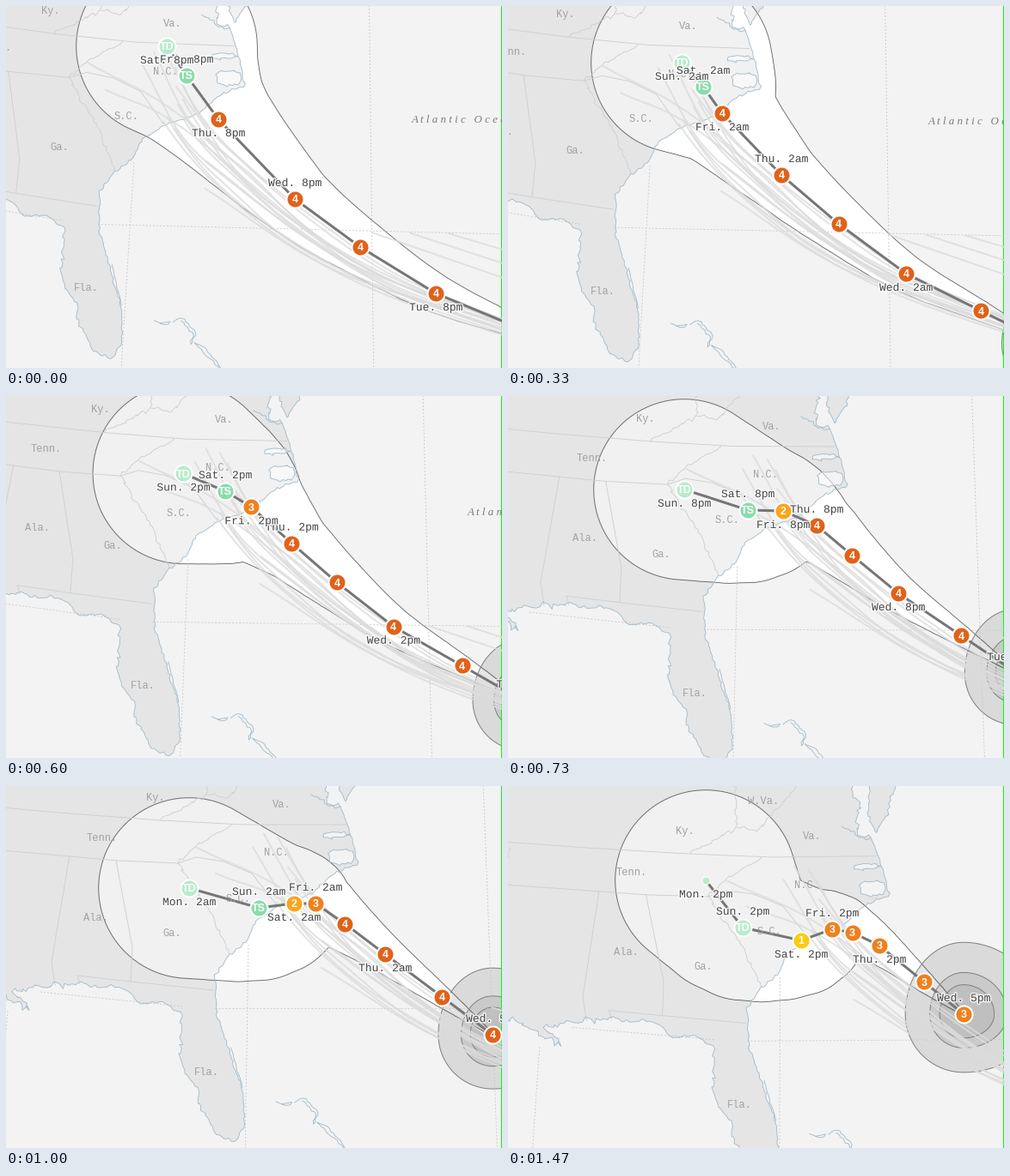
Animation, 577 px wide and 422 px high, one loop 1.54 s. Source, as a matplotlib script:

```python
import math

import numpy as np
import matplotlib.pyplot as plt
from matplotlib.animation import FuncAnimation
from matplotlib.patheffects import withStroke

W, H = 577, 422
LOOP, TICK = 1540, 10
STEP_TIMES = [0, 70, 130, 330, 400, 460, 530, 600, 660, 730, 800, 930,
              1000, 1270, 1330, 1400, 1470]

OCEAN, COAST, BORDER, LINE = "#f3f3f3", "#a6bccb", "#cfcfcf", "#767676"
COLORS = {"-": "#b8ecca", "D": "#b8ecca", "S": "#8adcab", "1": "#fccb10",
          "2": "#f9a51b", "3": "#ef801d", "4": "#e0621a"}
DAYS = ["Tue", "Wed", "Thu", "Fri", "Sat", "Sun", "Mon"]
HOURS = ["8pm", "2am", "8am", "2pm"]
NOW_HOURS = ["11pm", "5am", "11am", "5pm"]
LEAD = np.array([120, 96, 72, 48, 36, 24, 12, 0])

# step, advisory, map anchor, strengths, positions 120, 96, 72, 48, 24 and 0 hours ahead
KEYS = [
    (0, 0, (62, 164), "DS444444", [(187, 47), (210, 81), (247, 132), (336, 225), (500, 335), (680, 410)]),
    (3, 1, (78, 168), "DS444444", [(202, 66), (227, 94), (249, 125), (318, 197), (463, 312), (628, 394)]),
    (6, 2, (97, 169), "DS344444", [(207, 81), (243, 100), (268, 127), (319, 182), (449, 288), (606, 371)]),
    (9, 4, (178, 184), "DS244444", [(205, 109), (279, 133), (320, 134), (359, 151), (454, 230), (592, 323)]),
    (12, 5, (193, 171), "DS234444", [(213, 119), (294, 142), (335, 137), (360, 137), (441, 196), (566, 290)]),
    (13, 6, (205, 185), "DS234444", [(224, 117), (287, 155), (342, 157), (370, 151), (434, 190), (544, 278)]),
    (16, 7, (227, 210), "-D133333", [(230, 110), (273, 165), (341, 180), (377, 167), (432, 186), (530, 266)]),
]
KEY_STEPS = [k[0] for k in KEYS]
HOME = np.array([193, 171])

rng = np.random.default_rng(7)


def rough(points, amp=1.2, gap=3.5):
    """Resample a line and shake it like a shoreline."""
    p = np.array(points, float)
    d = np.r_[0, np.cumsum(np.hypot(*np.diff(p, axis=0).T))]
    s = np.linspace(0, d[-1], max(3, int(d[-1] / gap)))
    out = np.c_[np.interp(s, d, p[:, 0]), np.interp(s, d, p[:, 1])]
    out[1:-1] += rng.normal(0, amp, out[1:-1].shape)
    return out


def spline(points, n):
    """Catmull-Rom curve with n pieces between neighbours."""
    p = np.array(points, float)
    p = np.vstack([2 * p[0] - p[1], p, 2 * p[-1] - p[-2]])
    t = np.linspace(0, 1, n, endpoint=False)[:, None]
    parts = [b + t / 2 * (c - a + t * (2 * a - 5 * b + 4 * c - d + t * (3 * (b - c) + d - a)))
             for a, b, c, d in zip(p, p[1:], p[2:], p[3:])]
    return np.vstack(parts + [p[-2:-1]])


def blob(x, y, rx, ry):
    t = np.linspace(0, 2 * math.pi, 12)
    return rough(np.c_[x + rx * np.cos(t), y + ry * np.sin(t)])


GULF = rough([(-60, 236), (-25, 229), (5, 250), (28, 261), (8, 240), (35, 234), (91, 230)], 2)
PANHANDLE = rough([(91, 230), (98, 235), (125, 233), (142, 240), (157, 255), (183, 251),
                   (195, 262), (204, 264), (203, 318)])
FLORIDA = rough([(203, 318), (208, 332), (225, 358), (223, 368), (246, 407), (266, 416),
                 (277, 396), (276, 355), (262, 318)], .9)
ATLANTIC = rough([(262, 318), (245, 264), (243, 222), (259, 198), (281, 180), (291, 158),
                  (315, 141), (352, 128), (384, 101), (409, 91), (402, 58), (389, 24)], .9)
BAY = rough([(389, 24), (372, 20), (376, -14), (366, -30), (371, -60)], 1.8)
DELMARVA = rough([(388, -60), (386, -2), (394, 19), (405, 0), (426, -60)])
COASTLINE = np.vstack([GULF, PANHANDLE, FLORIDA, ATLANTIC, BAY])
MAINLAND = np.vstack([COASTLINE, [(371, -90), (-150, -90), (-150, 236)]])
SOUNDS = [blob(390, 82, 15, 9), blob(384, 57, 16, 3)]
SHORES = [
    rough([(355, 10), (380, 26), (389, 24)]),
    rough([(262, 305), (275, 352)], .6),
    rough([(314, 368), (327, 373), (334, 369), (321, 371)], .6),
    rough([(336, 369), (345, 363), (364, 381), (357, 396), (360, 382), (345, 367)], .7),
    rough([(362, 392), (372, 396), (390, 414), (396, 426), (382, 411), (362, 392)], .7),
]
RIVERS = [
    [(200, 90), (221, 70), (262, 45)],
    [(200, 90), (238, 148), (260, 196)],
    [(180, 40), (234, 10), (232, -45)],
    [(234, 10), (256, 14), (276, -6), (312, -45)],
    [(-60, 12), (-30, 30), (-34, 72)],
]
STATE_LINES = [
    [(-60, 20), (60, 31), (180, 40), (275, 45), (395, 45)],
    [(-60, 70), (130, 87), (200, 90), (221, 83), (253, 88), (286, 102), (315, 139)],
    [(128, 87), (147, 188), (145, 228)],
    [(74, 81), (53, 205), (57, 232)],
    [(86, 231), (83, 221), (145, 228), (241, 238)],
]
BORDERS = STATE_LINES + [rough(r) for r in RIVERS]
GRID = [
    [(282, 185), (278, 440)],
    [(553, -60), (572, 440)],
    [(2, 262), (-9, 390)],
    [(243, 259), (740, 259)],
    [(40, 240), (205, 257)],
]
PLACES = {"Ky.": (174, 13), "Va.": (321, 21), "Tenn.": (112, 60), "N.C.": (314, 77),
          "S.C.": (270, 131), "Ga.": (193, 171), "Ala.": (104, 153), "Fla.": (233, 333),
          "W.Va.": (265, -21)}


def model_runs():
    """Bundle of forecast model tracks, fanning out to the north-west."""
    spine = np.array([(298, 58), (352, 138), (412, 200), (495, 260), (600, 318), (760, 378)], float)
    fan = np.array([1, 1, 1, .85, .6, .4])
    runs = []
    for shift in np.linspace(-14, 26, 11):
        off = (shift + rng.normal(0, 6, 6)) * fan
        curve = spline(spine + off[:, None] * np.array([-.6, .75]), 6)
        runs.append(curve[rng.integers(0, 6):])
    for k in range(2):
        runs.append(spline([(367, 180 + 32 * k), (530, 290 + 16 * k), (760, 372)], 8))
        runs.append(spline([(222 + 22 * k, 72 + 30 * k), (340, 132 + 12 * k), (540, 290), (740, 366)], 8))
    for k in range(3):
        runs.append([(565 + 45 * k, 258), (745 + 10 * k, 318 - 14 * k)])
    return runs


RUNS = model_runs()


def warp(points, anchor):
    """Pan the map; it turns a little as it slides sideways."""
    x, y = (np.array(points, float) - HOME).T
    dx = anchor[0] - HOME[0]
    turn = .0004 * dx
    return np.c_[anchor[0] + x * (1 + .00013 * dx) + turn * y * (1 - x / 720),
                 anchor[1] + y - turn * x * (1 - x / 1100)]


def full_track(points):
    """Add the places 36 and 12 hours ahead."""
    p = np.array(points, float)
    at36 = spline(p[2:], 2)[3]
    at12 = .47 * p[4] + .53 * p[5]
    return np.vstack([p[:4], at36, p[4], at12, p[5]])


def hull(c1, r1, c2, r2):
    """Outline around two circles."""
    dx, dy = c2 - c1
    cosine = np.clip((r1 - r2) / max(math.hypot(dx, dy), 1e-6), -1, 1)
    d, a = math.atan2(dy, dx), math.acos(cosine)
    t1 = np.linspace(d + a, d + 2 * math.pi - a, 70)
    t2 = np.linspace(d - a, d + a, 50)
    return np.vstack([c1 + r1 * np.c_[np.cos(t1), np.sin(t1)],
                      c2 + r2 * np.c_[np.cos(t2), np.sin(t2)]])


def cone_parts(track):
    """The error circle grows evenly with the forecast hours."""
    path = spline(track, 3)
    hours = np.interp(np.arange(len(path)) / 3, range(len(LEAD)), LEAD)
    radii = 1 + .865 * hours
    return [hull(*part) for part in zip(path, radii, path[1:], radii[1:])]


def wind_ring(center, scale):
    t = np.linspace(0, 2 * math.pi, 90)
    c, s = np.cos(t), np.sin(t)
    return center + scale * np.c_[c * np.where(c > 0, 82, 64), s * np.where(s > 0, 64, 79)]


fig = plt.figure(figsize=((W + .01) / 72, (H + .01) / 72), dpi=72, facecolor=OCEAN)
ax = fig.add_axes([0, 0, 1, 1])


def line(p, **kw):
    ax.plot(*np.array(p).T, solid_capstyle="round", solid_joinstyle="round", **kw)


def fill(p, color, edge="none", lw=0):
    ax.fill(*np.array(p).T, facecolor=color, edgecolor=edge, lw=lw)


def write(x, y, s, size=13, color="#4c4c4c", family="Liberation Mono", **kw):
    ax.text(x, y, s, fontsize=size, color=color, family=family, clip_on=True,
            va="baseline", **{"ha": "center", **kw})


def draw_map(anchor, cone):
    for p in cone:
        fill(p, "white", LINE, 2)
    for p in cone:
        fill(p, "white")
    for p in GRID:
        ax.plot(*warp(p, anchor).T, color="#c6c6c6", lw=.8, dashes=(2.5, 2.5))
    for p in (MAINLAND, DELMARVA):
        fill(warp(p, anchor), (0, 0, 0, .053))
    for p in SOUNDS:
        fill(warp(p, anchor), (1, 1, 1, .55), COAST, .9)
    for p in BORDERS:
        line(warp(p, anchor), color=BORDER, lw=.9)
    for p in [COASTLINE, DELMARVA] + SHORES:
        line(warp(p, anchor), color=COAST, lw=.9)
    for name, spot in PLACES.items():
        x, y = warp([spot], anchor)[0]
        write(x, y + 4, name, 12, "#a2a2a2")
    x, y = warp([(609, 125)], anchor)[0]
    write(x, y + 4, " ".join("Atlantic Ocean"), 13, "#7c7c7c", "Liberation Serif",
          style="italic", ha="left")
    for p in RUNS:
        line(warp(p, anchor), color="#dcdcdc", alpha=.8, lw=2)


def draw_storm(track, strengths, adv):
    growth = .8 + .26 * adv / 7
    for size, shade in ((1, .1), (.58, .07), (.41, .05)):
        fill(wind_ring(track[-1], growth * size), (0, 0, 0, shade), "#808080", 1)
    line(track, color=LINE, lw=3)
    for (x, y), mark in zip(track, strengths):
        small = mark == "-"
        ax.plot(x, y, "o", ms=9 if small else 20, mfc=COLORS[mark], mec="white",
                mew=1 if small else 2)
        text = {"-": "", "D": "TD", "S": "TS"}.get(mark, mark)
        write(x, y + 4.3, text, 12.5, "white", "Liberation Sans", weight="bold")


def draw_tags(track, adv):
    last = 4 + (adv + 3) // 4
    tags = [(7, last - 5, NOW_HOURS[adv % 4])]
    tags += [(i, last - n, HOURS[adv % 4]) for n, i in enumerate((0, 1, 2, 3, 5))][::-1]
    halo = [withStroke(linewidth=3, foreground=(1, 1, 1, .8))]
    for i, day, hour in tags:
        x, y = track[i]
        y += 16 if i in (0, 2, 5) else -19
        write(x, y + 4, f"{DAYS[day]}. {hour}", path_effects=halo)


def draw(step):
    ax.clear()
    ax.set(xlim=(0, W), ylim=(H, 0))
    ax.axis("off")

    pos = np.interp(step, KEY_STEPS, range(len(KEYS)))
    i = min(int(pos), len(KEYS) - 2)
    a, b, f = KEYS[i], KEYS[i + 1], pos - i

    def mix(n):
        return np.array(a[n]) * (1 - f) + np.array(b[n]) * f

    adv = int(round(float(mix(1))))
    track = full_track(mix(4))
    draw_map(mix(2), cone_parts(track))
    draw_storm(track, (a if f < .5 else b)[3], adv)
    draw_tags(track, adv)
    fill([(576, 0), (W, 0), (W, H), (576, H)], "#00ff00")


shown = None


def update(frame):
    global shown
    step = int(np.searchsorted(STEP_TIMES, frame * TICK, side="right")) - 1
    if step != shown:
        draw(step)
        shown = step
    return []


anim = FuncAnimation(fig, update, frames=LOOP // TICK, interval=TICK,
                     repeat=True, repeat_delay=0)
plt.show()
```
